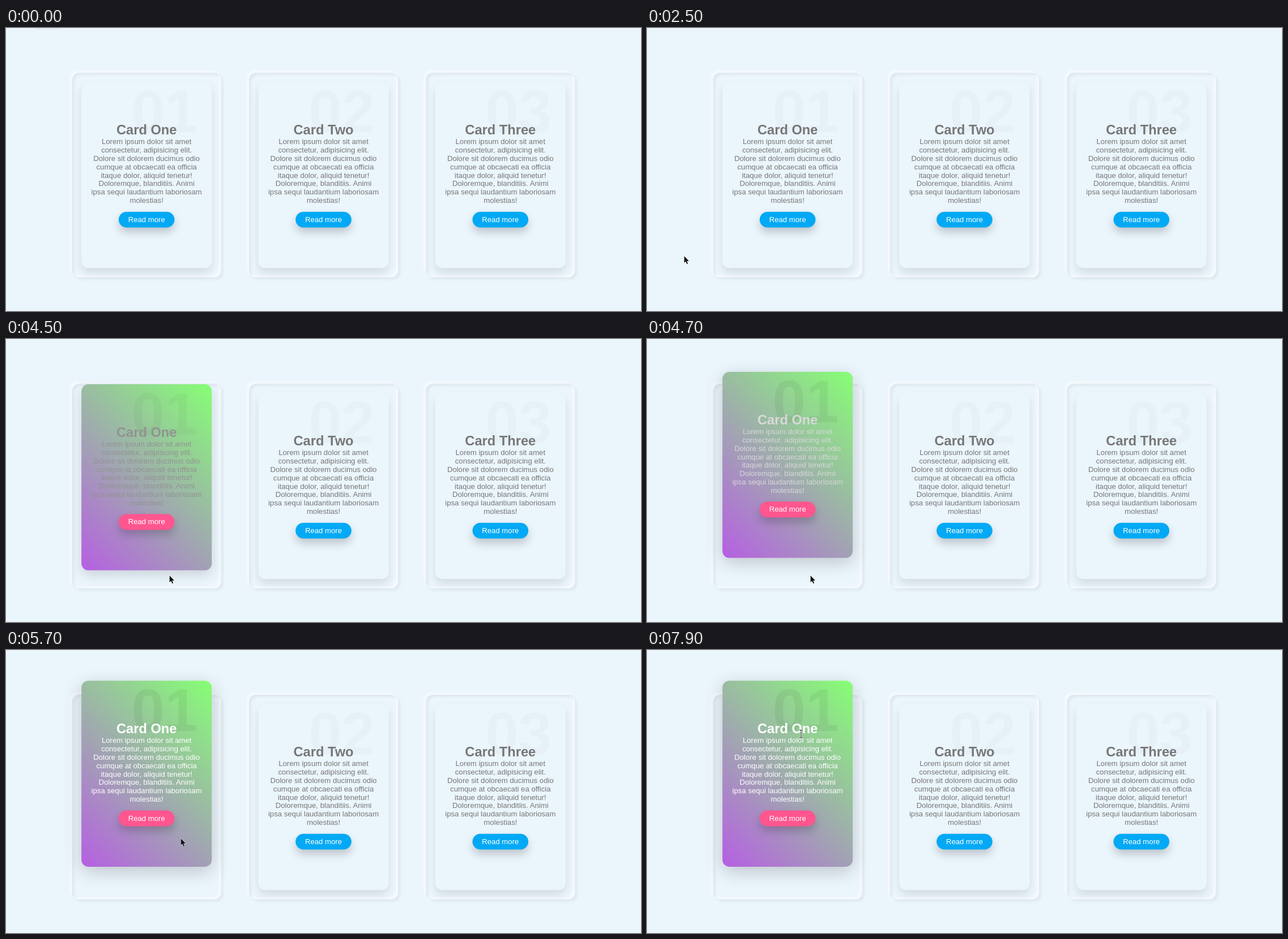
Recreate the animation shown at these times as an HTML page. Size 1121 px wide and 500 px high, loop 8000 ms.

```html
<!DOCTYPE html>
<html lang="en">
<head>
<meta charset="utf-8">
<title>Cards</title>
<style>
* { box-sizing: border-box; margin: 0; padding: 0; }
html, body { width: 100%; height: 100%; overflow: hidden; background: #ebf5fc; }
body { position: relative; font: 16px "Liberation Sans", Arial, sans-serif; }
#page {
  position: absolute; left: 0; top: 0; width: 1364px; height: 608px;
  transform: scale(calc(1121 / 1364)); transform-origin: 0 0;
}
.card {
  position: absolute; top: 96px; width: 320px; height: 440px; border-radius: 15px;
  box-shadow: inset 5px 5px 5px rgba(0,0,0,.05), inset -5px -5px 5px rgba(255,255,255,.5),
    5px 5px 5px rgba(0,0,0,.05), -5px -5px 5px rgba(255,255,255,.5);
}
.box {
  position: absolute; inset: 20px; border-radius: 15px; background: #ebf5fc; color: #777;
  display: flex; align-items: center; justify-content: center;
  box-shadow: 0 10px 20px rgba(0,0,0,.1);
}
.box.hover { background: linear-gradient(45deg, #b65fe2, #86ff74); }
h2 {
  position: absolute; top: -10px; right: 30px;
  font-size: 128px; color: rgba(0,0,0,.02);
}
.content { position: relative; text-align: center; white-space: nowrap; }
h3 { font-size: 28.8px; line-height: 33px; }
p { line-height: 18px; }
.more {
  display: block; width: max-content; margin: 15px auto 0; padding: 8px 20px;
  line-height: 18px; border-radius: 20px; background: #03a9f4; color: #fff;
  box-shadow: 0 10px 20px rgba(0,0,0,.2);
}
.hover .more { background: #ff568f; }
#smudge {
  position: absolute; left: 52px; top: -3px; width: 46px; height: 3px; border-radius: 3px;
  box-shadow: 0 0 4px rgba(150,110,120,.25);
}
#pointer { position: absolute; left: 0; top: 0; width: 100%; height: 100%; pointer-events: none; }
#pointer path { stroke-linejoin: round; }
</style>
</head>
<body>
<div id="page"></div>
<div id="smudge"></div>
<svg id="pointer">
  <path id="arrow" d="M.7 .9V12.8L3.4 10.4L5.4 15L7.2 14.2L5.3 9.7H9Z" fill="#111" stroke="#fff" paint-order="stroke"/>
  <path id="hand" d="M-1 1Q0 -.8 1.2 1V6L6.4 7.2Q7.6 7.6 7.4 9L6.4 14.5H.2L-3.8 9.6Q-3.6 8.2 -2.2 8.8L-1 10Z" fill="#fff" stroke="#111"/>
  <g id="beam" fill="none">
    <path d="M-2.5 -6.5H2.5M0 -6.5V6.5M-2.5 6.5H2.5" stroke="#fff" stroke-width="2.4"/>
    <path d="M-2.5 -6.5H2.5M0 -6.5V6.5M-2.5 6.5H2.5" stroke="#222"/>
  </g>
</svg>
<script>
const LOOP = 8000;
const STEP = 100;        // the screen is sampled ten times a second
const APPEAR = 600;      // pointer enters
const HOVER = 4500;      // first sample of the raised card
const HOVER_AGE = 117;   // transition time already passed by then
const MOVE = 200;        // longest pointer move before a stop

const $ = id => document.getElementById(id);
const mix = (a, b, k) => a + (b - a) * k;

const text = `Lorem ipsum dolor sit amet
consectetur, adipisicing elit.
Dolore sit dolorem ducimus odio
cumque at obcaecati ea officia
itaque dolor, aliquid tenetur!
Doloremque, blanditiis. Animi
ipsa sequi laudantium laboriosam
molestias!`.replaceAll('\n', '<br>');

$('page').innerHTML = ['One', 'Two', 'Three'].map((name, i) => `
  <div class="card" style="left:${142 + i * 380}px"><div class="box">
    <h2>0${i + 1}</h2>
    <div class="content"><h3>Card ${name}</h3><p>${text}</p><span class="more">Read more</span></div>
  </div></div>`).join('');

const box = document.querySelector('.box');
const number = box.querySelector('h2');

// Pointer rests: arrival time, x, y
const stops = [
  [APPEAR, 83, 7], [1000, 40, 86], [1500, 29, 198], [1800, 48, 302], [2200, 54, 376],
  [2500, 65, 402], [4200, 278, 435], [4500, 288, 417], [5000, 279, 372], [5700, 308, 332]
];

// CSS "ease": cubic-bezier(.25, .1, .25, 1)
function ease(x) {
  if (x <= 0) return 0;
  if (x >= 1) return 1;
  const curve = (a, b, u) => 3 * a * u * (1 - u) ** 2 + 3 * b * u * u * (1 - u) + u ** 3;
  let lo = 0, hi = 1;
  for (let i = 0; i < 24; i++) {
    const mid = (lo + hi) / 2;
    if (curve(.25, .25, mid) < x) lo = mid; else hi = mid;
  }
  return curve(.1, 1, lo);
}

function drawCard(t) {
  const hover = t >= HOVER;
  const age = hover ? t - HOVER + HOVER_AGE : 0;
  const lift = ease(age / 500);
  const grey = Math.round(mix(119, 255, ease(age / 750)));
  box.classList.toggle('hover', hover);
  box.style.transform = `translateY(${-50 * lift}px)`;
  box.style.boxShadow = `0 10px ${mix(20, 40, lift)}px rgba(0,0,0,${mix(.1, .2, lift)})`;
  box.style.color = `rgb(${grey},${grey},${grey})`;
  number.style.color = `rgba(0,0,0,${mix(.02, .055, lift)})`;
}

// Travel from stop to stop, resting until the next move is due
function travel(t) {
  const next = stops.findIndex(s => s[0] > t);
  if (next < 0) return stops.at(-1).slice(1);
  const [t0, x0, y0] = stops[next - 1];
  const [t1, x1, y1] = stops[next];
  const span = Math.min(MOVE, t1 - t0);
  const k = Math.max(0, 1 - (t1 - t) / span);
  return [mix(x0, x1, k), mix(y0, y1, k)];
}

// Back and forth across the button's edge
function wiggle(t) {
  const swing = Math.floor(t / 200) % 2;
  return [292 - 55 * swing, 317 - 21 * swing];
}

// Drifting upwards over the text while swaying
function sway(t) {
  const n = Math.floor(t / 220);
  const wave = Math.cos((n - 1) * Math.PI * 2 / 3);
  return [250 + 22 * wave, 186 - 7 * n - 10 * wave];
}

function pointerAt(t) {
  if (t < 6000) return travel(t);
  return t < 7000 ? wiggle(t - 6000) : sway(t - 7000);
}

function shapeAt(x, y) {
  if (x > 150 && y < 270) return 'beam';
  return x > 199 && x < 298 && y > 283 && y < 312 ? 'hand' : 'arrow';
}

function drawPointer(t) {
  $('pointer').style.display = t < APPEAR ? 'none' : '';
  if (t < APPEAR) return;
  const [x, y] = pointerAt(t);
  const shape = shapeAt(x, y);
  for (const id of ['arrow', 'hand', 'beam']) {
    $(id).setAttribute('transform', `translate(${x} ${y})`);
    $(id).style.display = id === shape ? '' : 'none';
  }
}

function render(time) {
  const t = Math.floor(time / STEP) * STEP;
  drawCard(t);
  drawPointer(time < 7000 ? t : time);
  $('smudge').style.display = t < APPEAR ? '' : 'none';
}

const start = performance.now();
function tick() {
  render((performance.now() - start) % LOOP);
  requestAnimationFrame(tick);
}
tick();
</script>
</body>
</html>
```
